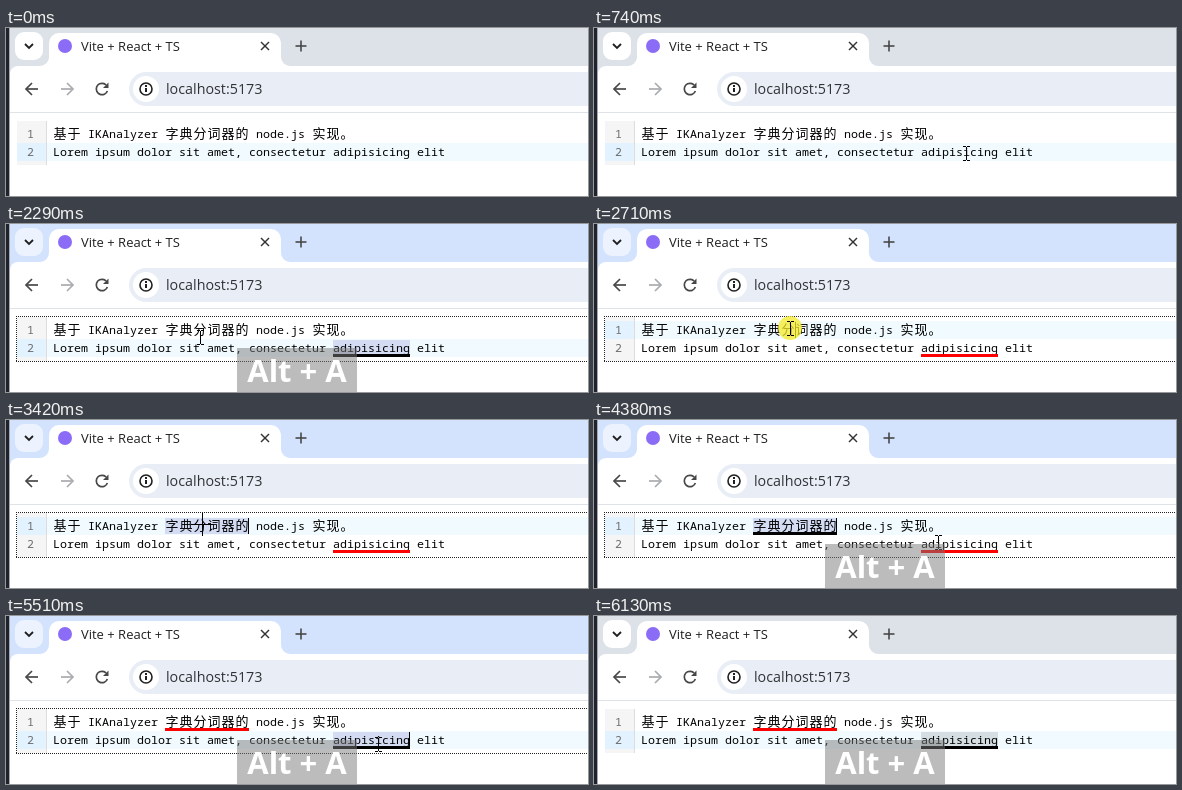
Write an HTML page with a canvas that moves like this. It is 582 by 168 pixels and loops after 6.18 s.

```html
<!DOCTYPE html>
<html lang="zh">
<head>
<meta charset="utf-8">
<title>Editor demo</title>
<style>
html, body { margin: 0; width: 582px; height: 168px; overflow: hidden; background: #fff; }
canvas { display: block; }
</style>
</head>
<body>
<canvas id="stage" width="582" height="168"></canvas>
<script>
const ctx = document.getElementById('stage').getContext('2d');
const LOOP = 6180, STEP = 70, BLUR = 6130, FOCUS = 810;
const UI = '"Open Sans", "Noto Sans", sans-serif';
const MONO = '11.67px "Noto Sans Mono", "Liberation Mono", monospace';
const HAN = '13px "Noto Sans CJK SC", "Noto Sans CJK", "Noto Sans CJK JP", sans-serif';
const LINES = [
  '基于 IKAnalyzer 字典分词器的 node.js 实现。',
  'Lorem ipsum dolor sit amet, consectetur adipisicing elit'
];
const WORDS = [{ x: 159, w: 84, row: 0 }, { x: 327, w: 77, row: 1 }];
const PRESSES = [1540, 3420, 5250];          // Alt goes down
const CLICKS = [[810, 940], [1210, 1280], [2710, 2780], [2910, 2980], [4720, 4790], [4920, 4990]];
// time, caret x, row, selected word
const CARETS = [
  [810, 375, 1, -1], [1210, 403, 1, 1], [2710, 201, 0, -1],
  [2910, 242, 0, 0], [4720, 375, 1, -1], [4920, 403, 1, 1]
];
// pointer stops: time, x, y
const PATH = [
  [200, 450, 182], [740, 372, 125], [1750, 372, 125], [2150, 198, 114], [2290, 194, 113],
  [2570, 196, 104], [3760, 196, 104], [4040, 240, 107], [4380, 344, 122], [4520, 372, 128]
];

const within = (t, a, b) => t >= a && t < b;
const rowTop = row => 97 + row * 18;

function rect(x, y, w, h, color) {
  ctx.fillStyle = color;
  ctx.fillRect(x, y, w, h);
}

function round(x, y, w, h, r, color) {
  ctx.fillStyle = color;
  ctx.beginPath();
  ctx.roundRect(x, y, w, h, r);
  ctx.fill();
}

function disc(x, y, r, color) {
  ctx.fillStyle = color;
  ctx.beginPath();
  ctx.arc(x, y, r, 0, Math.PI * 2);
  ctx.fill();
}

function stroke(points, color, width) {
  ctx.strokeStyle = color;
  ctx.lineWidth = width;
  ctx.beginPath();
  points.forEach(([x, y], i) => i ? ctx.lineTo(x, y) : ctx.moveTo(x, y));
  ctx.stroke();
}

function text(str, x, y, font, color, align = 'left') {
  ctx.font = font;
  ctx.fillStyle = color;
  ctx.textAlign = align;
  ctx.fillText(str, x, y);
}

function arrow(x, y, dir, color) {
  stroke([[x - 6 * dir, y], [x + 6 * dir, y]], color, 1.7);
  stroke([[x, y - 6], [x + 6 * dir, y], [x, y + 6]], color, 1.7);
}

function drawBrowser(focused) {
  const dark = '#474747';
  rect(0, 0, 582, 168, '#fff');
  rect(3, 0, 579, 46, focused ? '#d3e3fd' : '#dde1e8');
  round(4, 38, 600, 46, [8, 0, 0, 0], '#fff');

  // tab with flared feet
  ctx.fillStyle = '#fff';
  ctx.beginPath();
  ctx.moveTo(33, 38);
  ctx.arcTo(43, 38, 43, 28, 9);
  ctx.arcTo(43, 5, 53, 5, 10);
  ctx.arcTo(275, 5, 275, 15, 10);
  ctx.arcTo(275, 38, 285, 38, 9);
  ctx.lineTo(285, 39);
  ctx.lineTo(33, 39);
  ctx.fill();

  round(9, 4, 28, 28, 9, focused ? '#edf3fe' : '#fff');
  stroke([[19, 16], [23, 20], [27, 16]], '#1f1f1f', 1.8);
  disc(59, 18, 7, '#8b6cf6');
  text('Vite + React + TS', 75, 23, '13px ' + UI, '#1f1f1f');
  stroke([[255, 14], [263, 22]], '#333', 1.5);
  stroke([[263, 14], [255, 22]], '#333', 1.5);
  stroke([[289.5, 18], [300.5, 18]], dark, 1.6);
  stroke([[295, 12.5], [295, 23.5]], dark, 1.6);

  arrow(26, 61, -1, dark);
  arrow(61, 61, 1, '#a8abaf');
  ctx.strokeStyle = dark;
  ctx.lineWidth = 1.7;
  ctx.beginPath();
  ctx.arc(96, 61, 5.7, 0.35, 5.5);
  ctx.stroke();
  ctx.fillStyle = dark;
  ctx.beginPath();
  ctx.moveTo(102.5, 54.5);
  ctx.lineTo(102.5, 60);
  ctx.lineTo(97, 60);
  ctx.fill();

  round(123, 44, 490, 34, 17, '#e9eef6');
  disc(140, 61, 13, '#fff');
  ctx.strokeStyle = '#1f1f1f';
  ctx.lineWidth = 1.6;
  ctx.beginPath();
  ctx.arc(140, 61, 6, 0, Math.PI * 2);
  ctx.stroke();
  rect(139, 60, 2, 4, '#1f1f1f');
  rect(139, 57, 2, 2, '#1f1f1f');
  text('localhost:5173', 160, 66, '14.3px ' + UI, '#303236');
  rect(4, 84, 578, 1, '#dfe2e7');

  rect(0, 0, 3, 168, '#20222e');
  rect(3, 0, 1, 168, '#a5a8b0');
}

// Latin cells are 7px wide, Han cells 14px.
function drawCode(line, x, y) {
  for (const ch of line) {
    const latin = ch.charCodeAt(0) < 128;
    text(ch, latin ? x : x + 0.5, y, latin ? MONO : HAN, '#000');
    x += latin ? 7 : 14;
  }
}

function drawOutline() {
  for (let x = 10; x < 582; x += 2) {
    rect(x, 92, 1, 1, '#212121');
    rect(x, 137, 1, 1, '#212121');
  }
  for (let y = 92; y < 138; y += 2) rect(10, y, 1, 1, '#212121');
}

function drawEditor(t, focused) {
  const caret = CARETS.filter(c => t >= c[0]).pop();
  const active = caret ? caret[2] : 1;
  const selected = caret ? caret[3] : -1;

  rect(11, 93, 29, 44, '#f5f5f5');
  rect(40, 93, 1, 44, '#ddd');
  rect(11, rowTop(active), 29, 18, '#e2f2ff');
  if (selected >= 0) {
    const s = WORDS[selected];
    rect(s.x, rowTop(s.row) + 1, s.w, 16, focused ? '#d7d4f0' : '#d9d9d9');
  }
  rect(41, rowTop(active), 541, 18, '#cceeff44');

  LINES.forEach((line, row) => {
    text(String(row + 1), 28, rowTop(row) + 13, MONO, '#6c6c6c', 'right');
    drawCode(line, 47, rowTop(row) + 13);
  });

  WORDS.forEach((w, i) => {
    const marked = t >= PRESSES[i ? 0 : 1] + STEP;
    if (marked) rect(w.x, rowTop(w.row) + 15, w.w, 3, selected === i ? '#000' : '#f00');
  });

  if (!focused) return;
  if (Math.floor((t - caret[0]) / 600) % 2 === 0) {
    rect(caret[1], rowTop(caret[2]) + 1, 1, 16, '#000');
  }
  drawOutline();
}

function pointerAt(t) {
  const i = PATH.findIndex(p => p[0] > t);
  if (i < 0) return PATH[PATH.length - 1].slice(1);
  const [t0, x0, y0] = PATH[i - 1], [t1, x1, y1] = PATH[i];
  const k = Math.floor((t - t0) / STEP) * STEP / (t1 - t0);
  return [Math.round(x0 + (x1 - x0) * k), Math.round(y0 + (y1 - y0) * k)];
}

function drawPointer(t) {
  if (!within(t, 200, BLUR)) return;
  const [x, y] = pointerAt(t);
  if (CLICKS.some(c => within(t, ...c))) disc(x, y, 12, 'rgba(246,234,40,.75)');
  if (PRESSES.some(p => within(t, p, p + 200))) {
    rect(x - 11, y, 23, 1, '#000');
    rect(x, y - 11, 1, 23, '#000');
    return;
  }
  rect(x, y - 6, 1, 13, '#000');
  for (const end of [y - 7, y + 7]) {
    rect(x - 3, end, 3, 1, '#000');
    rect(x + 1, end, 3, 1, '#000');
  }
}

function drawKeys(t) {
  if (!PRESSES.some(p => within(t, p + STEP, p + 1100))) return;
  rect(231, 124, 120, 44, 'rgba(122,122,122,.5)');
  text('Alt + A', 291, 157.5, 'bold 31px ' + UI, '#fff', 'center');
}

function draw(t) {
  const focused = within(t, FOCUS, BLUR);
  drawBrowser(focused);
  drawEditor(t, focused);
  drawPointer(t);
  drawKeys(t);
}

const start = performance.now();
function tick(now) {
  draw(Math.max(0, now - start) % LOOP);
  requestAnimationFrame(tick);
}
draw(0);
requestAnimationFrame(tick);
</script>
</body>
</html>
```
